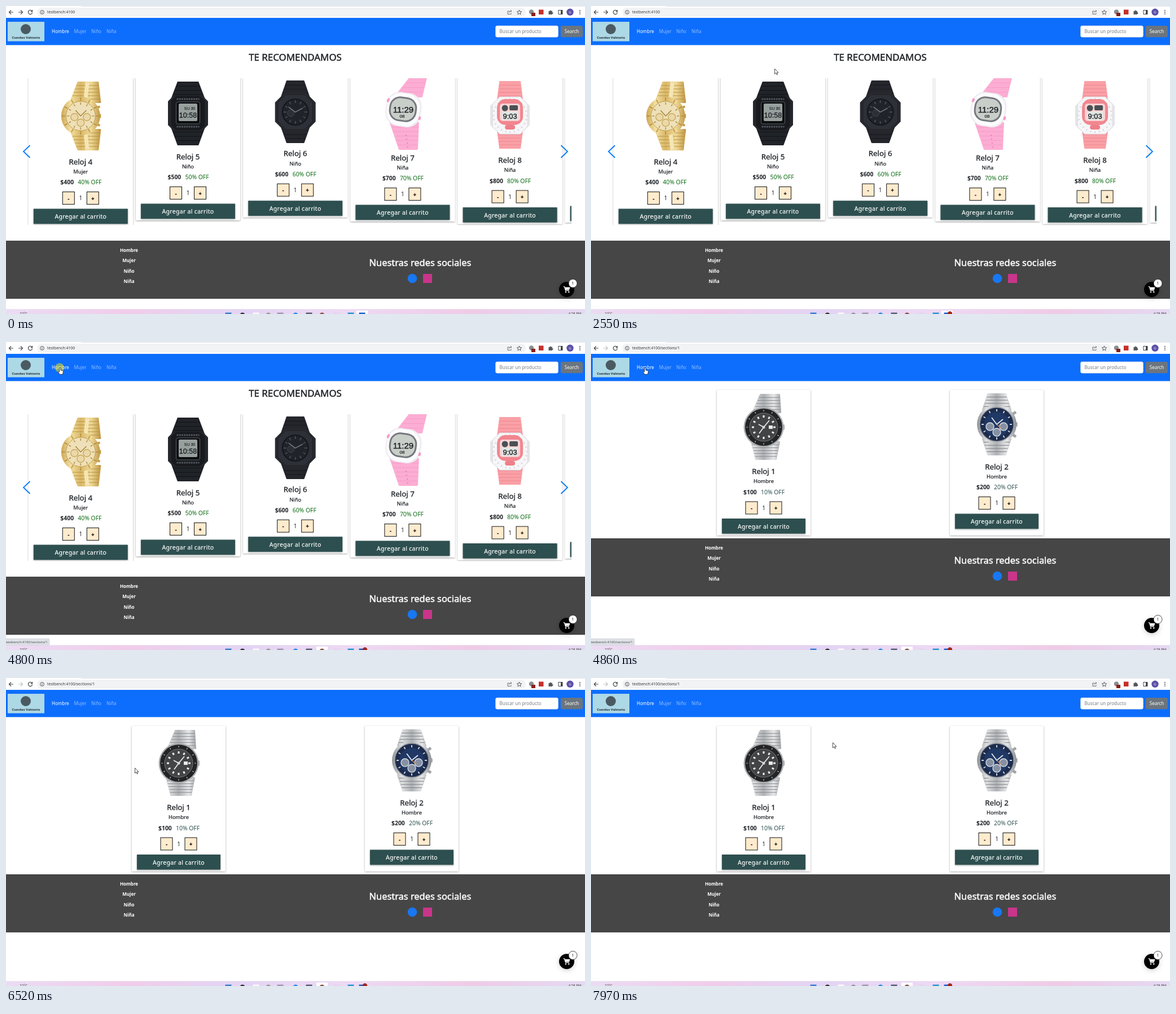
An HTML page for the animation above (8 s loop, 1026 by 546 pixels).

```html
<!DOCTYPE html>
<html lang="es">
<head>
<meta charset="utf-8">
<title>Tienda de relojes</title>
<style>
html, body { margin: 0; width: 100%; height: 100%; overflow: hidden; background: #fff; }
svg { display: block; width: 100vw; height: 100vh; }
text { font-family: "Noto Sans", "Open Sans", sans-serif; white-space: pre; }
</style>
</head>
<body>
<svg id="stage" viewBox="0 0 1026 546" xmlns="http://www.w3.org/2000/svg"></svg>
<script>
const LOOP = 8000, SWITCH = 4860;
const HOST = 'testbench:4100', ROUTE = HOST + '/sections/1';
const INK = '#212529', SLATE = '#2f4f4f', BLUE = '#0d6efd';
const SANS = '"Liberation Sans",sans-serif';

// --- markup helpers; text is placed by its vertical centre ---
// "medium" thickens regular glyphs with a hairline outline
const text = (x, y, s, size, o = {}) =>
  `<text x="${x}" y="${y + size * 0.36}" font-size="${size}" text-anchor="${o.at || 'middle'}" ` +
  `fill="${o.fill || INK}" font-weight="${o.w || 400}" letter-spacing="${o.ls || 0}"` +
  (o.medium ? ` stroke="${o.fill || INK}" stroke-width="${size * o.medium}"` : '') +
  (o.font ? ` style='font-family:${o.font}'` : '') + `>${s}</text>`;
const rect = (x, y, w, h, fill, extra = '') =>
  `<rect x="${x}" y="${y}" width="${w}" height="${h}" fill="${fill}" ${extra}/>`;
const circle = (x, y, r, fill, extra = '') =>
  `<circle cx="${x}" cy="${y}" r="${r}" fill="${fill}" ${extra}/>`;
const path = (d, fill, extra = '') => `<path d="${d}" fill="${fill}" ${extra}/>`;
const line = (d, color, w = 1, extra = '') =>
  path(d, 'none', `stroke="${color}" stroke-width="${w}" ${extra}`);
const group = (s, attrs) => `<g ${attrs}>${s}</g>`;

// --- watches, each drawn around its own case centre ---
// strap half: tapers from the free end (x, half width, y) to the case
const band = ([x1, h1, y1], [x2, h2, y2], color, gap, rows) => {
  let d = '';
  for (let i = 1; i < rows; i++) {
    const u = i / rows, x = x1 + (x2 - x1) * u, h = h1 + (h2 - h1) * u, y = y1 + (y2 - y1) * u;
    d += `M${x - h} ${y}H${x + h}`;
  }
  return path(`M${x1 - h1} ${y1}H${x1 + h1}L${x2 + h2} ${y2}H${x2 - h2}Z`, color,
    `stroke="${color}" stroke-width="2" stroke-linejoin="round"`) + line(d, gap, 1);
};
const ticks = (r, len, n, color, w) => {
  let d = '';
  for (let i = 0; i < n; i++) {
    const a = i / n * Math.PI * 2, c = Math.cos(a), s = Math.sin(a);
    d += `M${c * r} ${s * r}L${c * (r + len)} ${s * (r + len)}`;
  }
  return line(d, color, w);
};
const octagon = (w, h, k) =>
  `M${-w + k} ${-h}H${w - k}L${w} ${-h + k}V${h - k}L${w - k} ${h}H${-w + k}L${-w} ${h - k}V${-h + k}Z`;
const subdials = (pts, r, fill, edge) =>
  pts.map(([x, y]) => circle(x, y, r, fill, `stroke="${edge}" stroke-width="1.4"`)).join('');
const digits = (x, y, s, size) => text(x, y, s, size, { font: SANS, medium: .03 });

const goldWatch = () =>
  band([13, 18, -60], [8, 27, -24], 'url(#gold)', '#b8913f', 6) +
  band([13, 18, 60], [8, 27, 24], 'url(#gold)', '#b8913f', 6) +
  line('M12 -60L8 -24M12 60L8 24', '#f4e6b4', 7) +
  rect(31, -4, 5, 8, '#c39a45', 'rx="2"') + line('M30 -15L34 -17M30 15L34 17', '#c39a45', 4) +
  circle(0, 0, 34.5, 'url(#gold)') + ticks(27, 6, 12, '#b38c3c', 1.5) +
  circle(0, 0, 26, '#eee0b8', 'stroke="#c19d50"') + ticks(20, 4, 12, '#b3924b', 1.5) +
  subdials([[-11, 2], [11, 2], [0, 12]], 6.5, '#ead9a8', '#c9a95f') +
  line('M-9 -10L0 0L10 -10', '#a4833e', 1.5);

const blackDigital = () =>
  band([0, 18, -55], [0, 29, -26], '#202328', '#111317', 4) +
  band([0, 18, 56], [0, 29, 26], '#202328', '#111317', 4) +
  path(octagon(35.5, 30, 9), '#24272c') + path(octagon(30, 30, 8), '#181a1e') +
  line('M-20 -25H20M-20 24H20', '#50555b', 3, 'stroke-dasharray="3 1.200"') +
  rect(-21, -20, 42, 39, '#0c0e10', 'rx="3" stroke="#5a6066"') +
  rect(-16.5, -17, 33, 31, '#98a09e', 'rx="2"') +
  digits(3, -9, 'SU 30', 7) + digits(0, 3, '10:58', 12.5);

const blackAnalog = () =>
  band([0, 15, -55], [0, 25, -26], '#24262c', '#15171b', 4) +
  band([0, 15, 54], [0, 25, 26], '#24262c', '#15171b', 4) +
  path(octagon(36, 34, 17), '#282a30') +
  path(octagon(31, 31, 14), '#2d3037', 'stroke="#1a1c21"') +
  circle(0, 0, 23, '#202329', 'stroke="#14161a" stroke-width="2"') +
  ticks(16, 5, 12, '#454951', 2) + circle(-8, 2, 6, '#2c2f36', 'stroke="#41454d"') +
  line('M-12 -9L0 0L13 -7', '#6d737c', 1.6);

const pinkDigital = () =>
  band([27, 15, -55], [10, 24, -22], '#fcadd3', '#f79cc8', 4) +
  band([10, 16, 71], [3, 25, 24], '#fcadd3', '#f79cc8', 6) +
  line('M9 68L6 45', '#e87fb4', 2, 'stroke-dasharray="2 5"') +
  group(rect(-30, -30, 63, 61, '#efecf2', 'rx="24"') + rect(-28, -28, 58, 57, '#fcfcfe', 'rx="23"') +
    rect(-24, -22, 49, 44, '#74787d', 'rx="19"') + rect(-21, -19, 43, 38, '#c9cec9', 'rx="16"'),
    'transform="rotate(8)"') +
  digits(1, 1, '11:29', 15) + digits(-1, 12, '08', 8) +
  line('M-27 -13L-24 -19M31 13L29 19', '#f69bc8', 4);

const coralDigital = () =>
  band([0, 18, -60], [0, 22, -28], '#f9a0a6', '#f0868f', 5) +
  band([0, 18, 58], [0, 22, 28], '#f9a0a6', '#f0868f', 5) +
  path(octagon(35, 28, 11), '#e4e4e8') +
  path(octagon(31, 33, 13), '#f6f6f8', 'stroke="#dcdce1"') +
  ticks(28, 3, 24, '#c3c4ca', 1.2) +
  rect(-23, -29, 46, 46, '#f1868f', 'rx="15"') + rect(-18, -21, 36, 31, '#f9d3d5', 'rx="5"') +
  circle(-9, -13, 5.5, '#4a5054') + rect(-1, -18, 15, 9, '#4a5054', 'rx="2"') +
  rect(-14, -7, 28, 15, '#e3e7e4', 'rx="2"') + digits(0, 1, '9:03', 13) +
  rect(-9, 17, 18, 8, '#ee7f89', 'rx="4"');

const steelDiver = () =>
  band([11, 17, -58], [5, 25, -26], 'url(#steel)', '#85888c', 6) +
  band([4, 18, 57], [3, 25, 26], 'url(#steel)', '#85888c', 6) +
  rect(31, -5, 6, 10, '#a9acb0', 'rx="2"') +
  circle(0, 0, 35.5, '#a9acaf') + circle(0, 0, 33, '#222426') +
  ticks(28, 3, 12, '#b9bcbf', 1.2) +
  circle(0, 0, 25, '#424446', 'stroke="#77797c"') + ticks(17, 4, 12, '#eceeee', 3) +
  rect(9, -3, 7, 6, '#e9e9e9') + line('M-8 11L0 0L10 -12M0 0L-9 -5', '#e8eaeb', 1.8) +
  circle(0, 0, 2.5, '#d5d7d9');

const blueChrono = () =>
  band([0, 16, -54], [0, 25, -26], 'url(#steel)', '#7c7f83', 5) +
  band([0, 16, 54], [0, 25, 26], 'url(#steel)', '#7c7f83', 5) +
  rect(30, -4, 7, 8, '#aeb1b5', 'rx="2"') +
  line('M28 -18L34 -22M28 18L34 22', '#a0a3a7', 5) +
  circle(0, 0, 35, 'url(#steel)') + circle(0, 0, 30, '#1d2c4d', 'stroke="#8b9097" stroke-width="1.5"') +
  ticks(23, 4, 12, '#cfd5df', 2) + circle(0, 0, 22, '#203865') +
  subdials([[-12, 4], [12, 4], [0, 14]], 7, '#8791a3', '#d9dde2') +
  line('M-9 -12L0 0L11 -9', '#e4e8ee', 1.8) + line('M0 0L8 7', '#e08a4a', 1.2);

// --- product card: y is the centre line of its title ---
function card({ cx, y, half, n, kind, top, bottom, off, watch, wy }) {
  const qty = (x, s) => rect(x - 10.5, y + 53.5, 21, 22, '#ffebcd', 'stroke="#111"') +
    text(x, y + 65, s, 10, { w: 700, fill: '#000' });
  const bw = half - 9;
  return rect(cx - half, top, half * 2, bottom - top, '#fff', 'filter="url(#shade)"') +
    (watch ? group(watch(), `transform="translate(${cx} ${wy})"`) : '') +
    text(cx, y, 'Reloj ' + n, 13.3, { medium: .025 }) +
    text(cx, y + 17.5, kind, 9.4, { medium: .025 }) +
    text(cx - 36, y + 36.7, `$${n}00`, 10.4, { w: 700, at: 'start' }) +
    text(cx - 5, y + 36.7, `${n}0% OFF`, 10.4, { fill: off, at: 'start' }) +
    qty(cx - 21.5, '-') + text(cx, y + 64.5, '1', 10) + qty(cx + 21.5, '+') +
    rect(cx - bw, y + 83.5, bw * 2, 26.7, SLATE, 'filter="url(#shade)"') +
    text(cx, y + 97.5, 'Agregar al carrito', 10.5, { fill: '#fff', ls: .3, medium: .015 });
}

const footer = y => rect(0, y, 1026, 103, '#464646') +
  ['Hombre', 'Mujer', 'Niño', 'Niña'].map((s, i) =>
    text(218, y + 17.3 + i * 18.2, s, 8, { w: 700, fill: '#fff' })).join('') +
  text(734, y + 39, 'Nuestras redes sociales', 16.4, { medium: .03, fill: '#fff' }) +
  circle(720, y + 67, 8.3, '#1877f2') + rect(739, y + 59, 16, 16, '#c9358a');

const homeCards = [
  [4, 'Mujer', 276, goldWatch, 195], [5, 'Niño', 267, blackDigital, 190],
  [6, 'Niño', 261.7, blackAnalog, 188], [7, 'Niña', 269, pinkDigital, 183],
  [8, 'Niña', 273.5, coralDigital, 194], [9, 'Niña', 271, null, 190]
].map(([n, kind, y, watch, wy], i) => card({
  n, kind, y, watch, wy, cx: 132.3 + i * 190.2, half: 92.5,
  top: 118, bottom: y + 113, off: '#0b6b12'
})).join('');

const home = text(512.5, 91, 'TE RECOMENDAMOS', 16.9, { medium: .03 }) +
  group(homeCards, 'clip-path="url(#slider)"') +
  line('M42.5 247L31 258L42.5 269M983.5 247L995 258L983.5 269', '#007aff', 1.8) + footer(416);

const catalog = [[1, 306, 229.5, steelDiver, 151], [2, 719, 221, blueChrono, 146]]
  .map(([n, cx, y, watch, wy]) => card({
    n, cx, y, watch, wy, kind: 'Hombre', half: 83, top: 85, bottom: 342.5, off: SLATE
  })).join('') + footer(348);

// --- browser frame and navigation ---
const arrowIcon = (x, dir, color, id = '') =>
  line(`M${x - 4 * dir} 11H${x + 3.5 * dir}M${x} 7.5L${x + 3.5 * dir} 11L${x} 14.5`, color, 1.2, id);

const browser = rect(0, 0, 1026, 21, '#fff') + rect(133, 0, 893, 1, '#dee1e6') +
  rect(55, 3, 866, 16, '#f1f3f4', 'rx="8"') +
  arrowIcon(9, -1, '#44474b') + arrowIcon(26, 1, '#44474b', 'id="forward"') +
  line('M46 9A3.6 3.6 0 1 0 46.6 11.5M46.6 7V9.8H43.8', '#44474b', 1.2) +
  circle(64, 11, 3.4, 'none', 'stroke="#55585c"') + line('M64 10.3V13M64 8.7V9.5', '#55585c') +
  group(text(73, 11, HOST, 6.8, { at: 'start', fill: '#33363a' }), 'id="url"') +
  line('M892 9H889V14.5H895V12.5M891 12Q891.5 9 895.5 9M894 7L896 9L894 11', '#5f6368', .9) +
  line('M909.5 7L910.7 9.8L913.7 10L911.4 12L912.1 15L909.5 13.4L906.9 15L907.6 12L905.3 10L908.3 9.8Z', '#44474b', .9) +
  circle(931, 10.5, 4.2, '#8b8e92') + rect(931, 12, 7, 6, '#8a2018') +
  rect(944, 6.5, 8.5, 8.5, '#c5302c') +
  path('M961.5 9H963.5A1.5 1.5 0 0 1 966.5 9H968V11A1.5 1.5 0 0 1 968 14V15H961.5Z', '#55585c') +
  rect(979, 7.5, 7, 7, 'none', 'stroke="#44474b"') + rect(983, 7.5, 3, 7, '#44474b') +
  circle(999.5, 10.8, 6.2, '#5b50a8') + text(999.5, 10.8, 'G', 6, { fill: '#fff' }) +
  [8, 11, 14].map(y => circle(1017, y, .9, '#44474b')).join('');

const nav = rect(0, 21, 1026, 48.3, BLUE) +
  rect(3, 28, 65, 34.5, '#add8e6') + circle(35, 41, 9, '#4b5a62') +
  text(35.3, 56, 'Cuerdas Valmoria', 6.2, { w: 700, fill: '#2d3940', font: 'Roboto,sans-serif' }) +
  [[81, 'Hombre'], [120.5, 'Mujer'], [151, 'Niño'], [178, 'Niña']].map(([x, s], i) =>
    text(x, 45.5, s, 8, { at: 'start', fill: i ? '#92bdfe' : '#fff' })).join('') +
  rect(867.5, 35, 111, 20.2, '#fff', 'rx="3" stroke="#ced4da" stroke-width=".6"') +
  text(874.5, 45.5, 'Buscar un producto', 8, { at: 'start', fill: '#777d84' }) +
  rect(983, 35, 39, 20.2, '#6c757d', 'rx="3"') + text(1002.5, 45.5, 'Search', 8.1, { fill: '#fff' });

const cart = circle(993.5, 502.5, 13.5, '#000', 'filter="url(#glow)"') +
  line('M987.5 497.5H989.5L991.5 504.5H998', '#fff', 1.2) +
  path('M989.9 498.5H999.5L998 503.5H991.3Z', '#fff') +
  circle(992, 507, 1.2, '#fff') + circle(997.3, 507, 1.2, '#fff') +
  circle(1004.5, 491.7, 7.5, '#fff', 'stroke="#222" stroke-width=".8"') + text(1004.5, 491.7, '1', 7.5);

const taskIcons = [[394, '#3d7fd0'], [419, '#333'], [443, '#fafafa'], [465, '#999'], [486, '#a49ab0'],
  [513, '#2b8be0'], [537, '#5b5f75'], [560, '#8a5148'], [586, '#e2d5ee'], [611, '#3094cf'], [631, '#1d62c9']];
const taskbar = rect(0, 537.3, 1026, 9, 'url(#task)') +
  rect(0, 540, 20, 6, '#fff', 'id="focus"') +
  taskIcons.map(([x, c], i) => i % 2 && i < 9 ? circle(x, 548, 4.5, c) : rect(x - 5.5, 543.5, 11, 4, c)).join('') +
  circle(636, 545.5, 4.2, '#a3231d', 'id="badge"') +
  text(31, 546, '22°C', 6.2, { fill: '#444' }) + text(1008, 546, '4:28 PM', 6.2, { fill: '#444' });

const outline = 'stroke="#222" stroke-width=".8"';
const pointers =
  group(path('M0 0V9.3L2.2 7.3L3.7 10.6L5.1 10L3.7 6.8H6.5Z', '#fff', outline), 'id="arrow"') +
  group(path('M-1.2 1A1.1 1.1 0 0 1 1 1V4.5L4.5 5.3Q5.6 5.7 5.4 7L4.6 11.8H-.8L-3.8 7.5Q-3.6 6.2 -1.2 7.6Z',
    '#fff', outline), 'id="hand"');
const tip = group(rect(-2, 526, 46, 11.3, '#dee1e6', 'id="tipBox" rx="2" stroke="#c3c6cb" stroke-width=".6"') +
  text(-.5, 532, HOST, 6, { at: 'start', fill: '#4b4f54' }), 'id="tip"');

const gradient = (id, stops, attrs = '') => `<linearGradient id="${id}" ${attrs}>` +
  stops.map((c, i) => `<stop offset="${i / (stops.length - 1)}" stop-color="${c}"/>`).join('') + '</linearGradient>';
const shadow = (id, dy, blur, alpha) =>
  `<filter id="${id}" x="-50%" y="-50%" width="200%" height="200%">` +
  `<feDropShadow dx="0" dy="${dy}" stdDeviation="${blur}" flood-opacity="${alpha}"/></filter>`;
const wide = 'gradientUnits="userSpaceOnUse" x1="-36" x2="36"';

document.getElementById('stage').innerHTML = '<defs>' +
  gradient('gold', ['#c9a14d', '#f3e0a2', '#d9b768', '#f0da98', '#bd9443'], wide) +
  gradient('steel', ['#8b8e92', '#dfe1e3', '#aeb1b4', '#e7e8ea', '#85888c'], wide) +
  gradient('task', ['#eadcf3', '#f1cdea', '#e3d4f4', '#edd9f3', '#efcbe6', '#e4d9f2']) +
  '<clipPath id="slider"><rect x="37.5" y="128" width="964.5" height="260.5"/></clipPath>' +
  shadow('shade', 1, 1.7, .36) + shadow('glow', 2, 4, .2) + '</defs>' +
  rect(0, 0, 1026, 546, '#fff') +
  group(home, 'id="home"') + group(catalog, 'id="catalog"') + nav + browser + cart + taskbar + tip +
  circle(95, 45.5, 8, '#ffeb00', 'id="press" opacity=".5"') + pointers;

const bursts = [[70, 820, 13], [890, 1680, 13], [1750, 2020, 5], [2420, 3210, 13], [3280, 3480, 3],
  [3940, 4330, 7], [4730, 4860, 3], [5260, 6050, 13], [6120, 6910, 13], [6980, 7770, 13], [7840, 7970, 3]];
const keys = [[0, 872, 560], [70, 869, 540], [430, 690, 400], [820, 492, 249], [1120, 415, 150],
  [1417, 352.5, 94], [1550, 305, 58], [1680, 277, 91], [2020, 346, 116], [2420, 344, 115],
  [2810, 180, 82], [3210, 39, 48], [3480, 38, 46], [3940, 39, 46], [4330, 96, 45.5], [5194, 96, 45.5],
  [5460, 200, 190], [5700, 530, 310], [5900, 844, 250], [6050, 812, 130], [6250, 560, 94],
  [6515, 228.5, 159.5], [6650, 227, 255], [6780, 310, 327], [6910, 560, 300], [7110, 757, 235],
  [7300, 600, 197], [7500, 330, 205], [7640, 234, 270], [7770, 262, 321], [7840, 430, 300],
  [7905, 536, 205], [7970, 428.5, 114.5]];

function captured(t) {
  let at = 0;
  for (const [a, b, n] of bursts) {
    if (t < a) break;
    const step = (b - a) / (n - 1);
    at = Math.min(b, a + Math.floor((t - a) / step + 1e-6) * step);
  }
  return at;
}

// cubic Hermite curve through the keys
function pointer(t) {
  let i = 0;
  while (i < keys.length - 2 && t >= keys[i + 1][0]) i++;
  const p = keys[i], q = keys[i + 1], o = keys[i - 1] || p, r = keys[i + 2] || q;
  const span = q[0] - p[0], u = Math.min(1, (t - p[0]) / span);
  const slope = (a, b, k) => (b[k] - a[k]) / (b[0] - a[0]) * span;
  return [1, 2].map(k => {
    if (p[k] === q[k]) return p[k];
    const m = slope(o, q, k), n = slope(p, r, k), v = u * u, w = v * u;
    return (2 * w - 3 * v + 1) * p[k] + (w - 2 * v + u) * m + (3 * v - 2 * w) * q[k] + (w - v) * n;
  });
}

const el = id => document.getElementById(id);
const show = (id, on) => el(id).setAttribute('display', on ? 'inline' : 'none');

function render(t) {
  const second = t >= SWITCH, [x, y] = pointer(captured(t));
  show('home', !second);
  show('catalog', second);
  el('url').firstChild.textContent = second ? ROUTE : HOST;
  el('forward').setAttribute('stroke', second ? '#bfc1c4' : '#44474b');

  const hover = y > 28 && y < 62 && (x > 3 && x < 68 || x > 76 && x < 116);
  show('hand', hover);
  show('arrow', !hover && t >= 70);
  for (const id of ['hand', 'arrow']) el(id).setAttribute('transform', `translate(${x} ${y})`);

  const link = t >= 4200;
  show('tip', t >= 3280 && t < 5390);
  el('tip').lastChild.textContent = link ? ROUTE : HOST;
  el('tipBox').setAttribute('width', link ? 79 : 46);
  show('press', t >= 4730 && t < SWITCH);

  show('badge', t >= 400);
  el('focus').setAttribute('x', t >= 4730 ? 550 : 621);
}

function tick() {
  render(performance.now() % LOOP);
  requestAnimationFrame(tick);
}
tick();
</script>
</body>
</html>
```
